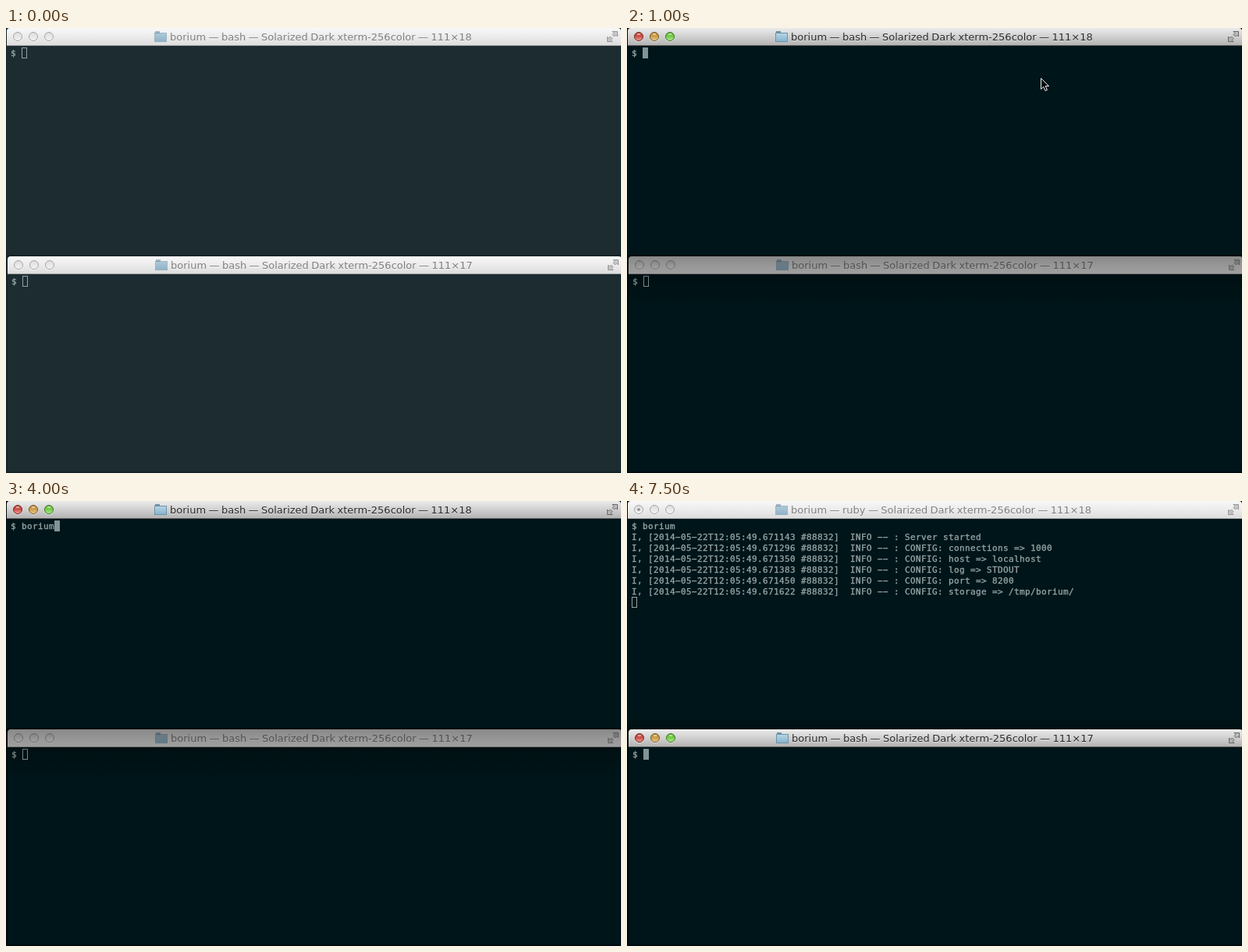
An HTML page with a canvas that plays this animation: 788x571 px, repeating every 8000 ms.

```html
<!DOCTYPE html>
<html lang="en">
<head>
<meta charset="utf-8">
<title>Terminal session</title>
<style>
html, body { margin: 0; width: 100%; height: 100%; overflow: hidden; background: #000b0f; }
canvas { display: block; }
</style>
</head>
<body>
<canvas id="stage" width="788" height="571"></canvas>
<script>
const g = document.getElementById('stage').getContext('2d');
const W = 788, H = 571, LOOP = 8000, STEP = 250;
const CW = 7, CH = 14, BAR = 23, WIN = 787;
const MONO = '11px "DejaVu Sans Mono", monospace';
const SANS = '13px "DejaVu Sans", sans-serif';
const INK = '#93a3a4';

const FOCUS_TOP = 1000, TYPE = 3000, RUN = 4250, FOCUS_LOW = 5250;

// The pointer takes one point per step and rests on the last one
const sweeps = [
  { from: 500, to: 2500, path: [[595, -9], [528, 69], [530, 64], [785, 48], [786, 45]] },
  { from: 4750, to: 5500, path: [[660, 449], [625, 494], [628, 494]] }
];

const log = Object.entries({
  143: 'Server started',
  296: 'CONFIG: connections => 1000',
  350: 'CONFIG: host => localhost',
  383: 'CONFIG: log => STDOUT',
  450: 'CONFIG: port => 8200',
  622: 'CONFIG: storage => /tmp/borium/'
}).map(([us, msg]) => `I, [2014-05-22T12:05:49.671${us} #88832]  INFO -- : ${msg}`);

const clamp = v => Math.max(0, Math.min(1, v));
const title = (shell, rows) =>
  `borium — ${shell} — Solarized Dark xterm-256color — 111×${rows}`;

// Whole letters, typed quickly at first and slower at the end
function typed(word, t) {
  const p = clamp(Math.floor((t - TYPE) / STEP) / 4);
  return word.slice(0, Math.round(word.length * (1 - (1 - p) ** 1.4)));
}

function fade(y0, y1, ...stops) {
  const f = g.createLinearGradient(0, y0, 0, y1);
  stops.forEach((c, i) => f.addColorStop(i / (stops.length - 1), c));
  return f;
}

function rect(x, y, w, h, fill) {
  g.fillStyle = fill;
  g.fillRect(x, y, w, h);
}

function poly(points, fill, stroke) {
  g.beginPath();
  points.forEach(p => g.lineTo(...p));
  g.closePath();
  g.fillStyle = fill;
  g.fill();
  g.strokeStyle = stroke;
  g.lineWidth = 1;
  g.stroke();
}

function oval(x, y, rx, ry, fill, stroke) {
  g.beginPath();
  g.ellipse(x, y, rx, ry, 0, 0, 7);
  g.fillStyle = fill;
  g.fill();
  if (stroke) { g.strokeStyle = stroke; g.lineWidth = 1; g.stroke(); }
}

function button(x, hue, active, dot) {
  oval(x, 12, 6, 6, 'rgba(255,255,255,.5)');
  if (active) {
    const tone = l => `hsl(${hue} 58% ${l}%)`;
    oval(x, 11, 5.5, 5.5, fade(5, 17, tone(42), tone(55), tone(78)), tone(30));
    oval(x, 8, 2.5, 1.3, 'rgba(255,255,255,.5)');
  } else {
    oval(x, 11, 5.5, 5.5, fade(5, 17, '#dcdcdc', '#f4f4f4'), '#a6a6a6');
  }
  if (dot) oval(x, 11, 1.8, 1.8, active ? '#701a15' : '#888');
}

function folder(active) {
  g.save();
  if (!active) g.globalAlpha = .6;
  rect(191, 4, 6, 3, '#6f92a8');
  rect(190, 6, 16, 12, '#6f92a8');
  rect(191, 7, 14, 10, fade(7, 17, '#b5d5e5', '#86b4cf'));
  g.restore();
}

// Two arrows around one centre, pointing away from each other
function expandIcon(color) {
  for (const side of [1, -1]) {
    g.save();
    g.translate(777, 11);
    g.scale(side, side);
    poly([[0, -6.5], [6.5, -6.5], [6.5, 0], [4.5, -2], [2.5, 0], [0, -2.5], [2, -4.5]],
      'rgba(160,160,160,.5)', color);
    g.restore();
  }
}

function titleBar(text, active, dot) {
  g.beginPath();
  g.roundRect(0, 0, WIN, BAR, [4, 4, 0, 0]);
  g.fillStyle = active ? fade(0, BAR, '#ebebeb', '#cfcfcf', '#b0b0b0')
                       : fade(0, BAR, '#f8f8f8', '#ebebeb', '#dcdcdc');
  g.fill();
  rect(0, BAR - 1, WIN, 1, active ? '#585858' : '#9a9a9a');

  g.save();
  g.translate(-1, 0);
  [4, 39, 100].forEach((hue, i) => button(15 + i * 20, hue, active, dot && i === 0));
  folder(active);
  expandIcon(active ? '#686868' : '#989898');
  g.font = SANS;
  g.wordSpacing = '-0.7px';
  g.fillStyle = 'rgba(255,255,255,.5)';
  g.fillText(text, 210, 17);
  g.fillStyle = active ? '#2b2b2b' : '#808080';
  g.fillText(text, 210, 16);
  g.restore();
}

function textLine(line, row) {
  // the minus sign gives the wide hyphen of a terminal face
  [...line.replaceAll('-', '−')].forEach((c, i) => {
    const x = 5 + i * CW, y = 36 + row * CH;
    g.fillText(c, x, y);
    g.strokeText(c, x, y);
  });
}

function terminal(x, y, h, o) {
  g.save();
  g.translate(x, y);
  rect(0, BAR - 1, WIN, h - BAR + 1, o.back);
  titleBar(o.title, o.active, o.dot);

  g.font = MONO;
  g.fillStyle = g.strokeStyle = INK;
  g.lineWidth = .35;
  o.lines.forEach(textLine);

  const row = o.lines.length - 1;
  const cx = 5 + o.lines[row].length * CW, cy = 25 + row * CH;
  g.strokeStyle = INK;
  g.lineWidth = 1;
  if (o.active) rect(cx, cy, CW, CH, '#839496');
  else g.strokeRect(cx + .5, cy + .5, CW - 1, CH - 1);
  g.restore();
}

function shade(y0, y1, ...alphas) {
  rect(0, y0, W, y1 - y0, fade(y0, y1, ...alphas.map(a => `rgba(0,0,0,${a})`)));
}

function drawPointer(t) {
  const sweep = sweeps.find(s => t >= s.from && t < s.to);
  if (!sweep) return;
  const { path, from } = sweep;
  const i = Math.min(path.length - 1, Math.floor((t - from) / STEP));
  g.save();
  g.translate(...path[i]);
  poly([[.5, .5], [.5, 14.5], [3.7, 11.4], [6, 16.5], [8.4, 15.5], [6.2, 10.5], [10.5, 10.5]],
    '#050505', '#f2f2f2');
  g.restore();
}

function draw(t) {
  const pale = t < STEP;
  const running = t >= RUN;
  const lowActive = t >= FOCUS_LOW;
  const topActive = t >= FOCUS_TOP && !lowActive;
  const back = pale ? '#1c2c31' : '#001519';
  const command = '$ ' + typed('borium', t);

  rect(0, 0, W, H, pale ? '#142328' : '#000b0f');

  terminal(1, 0, 291, {
    back, title: title(running ? 'ruby' : 'bash', 18), active: topActive, dot: running,
    lines: running ? [command, ...log, ''] : [command]
  });
  if (lowActive) shade(278, 293, 0, .3);

  terminal(2, 293, 276, { back, title: title('bash', 17), active: lowActive, lines: ['$ '] });
  if (topActive) shade(293, 353, .45, .22, 0);

  drawPointer(t);
}

function tick() {
  draw(performance.now() % LOOP);
  requestAnimationFrame(tick);
}
tick();
</script>
</body>
</html>
```
